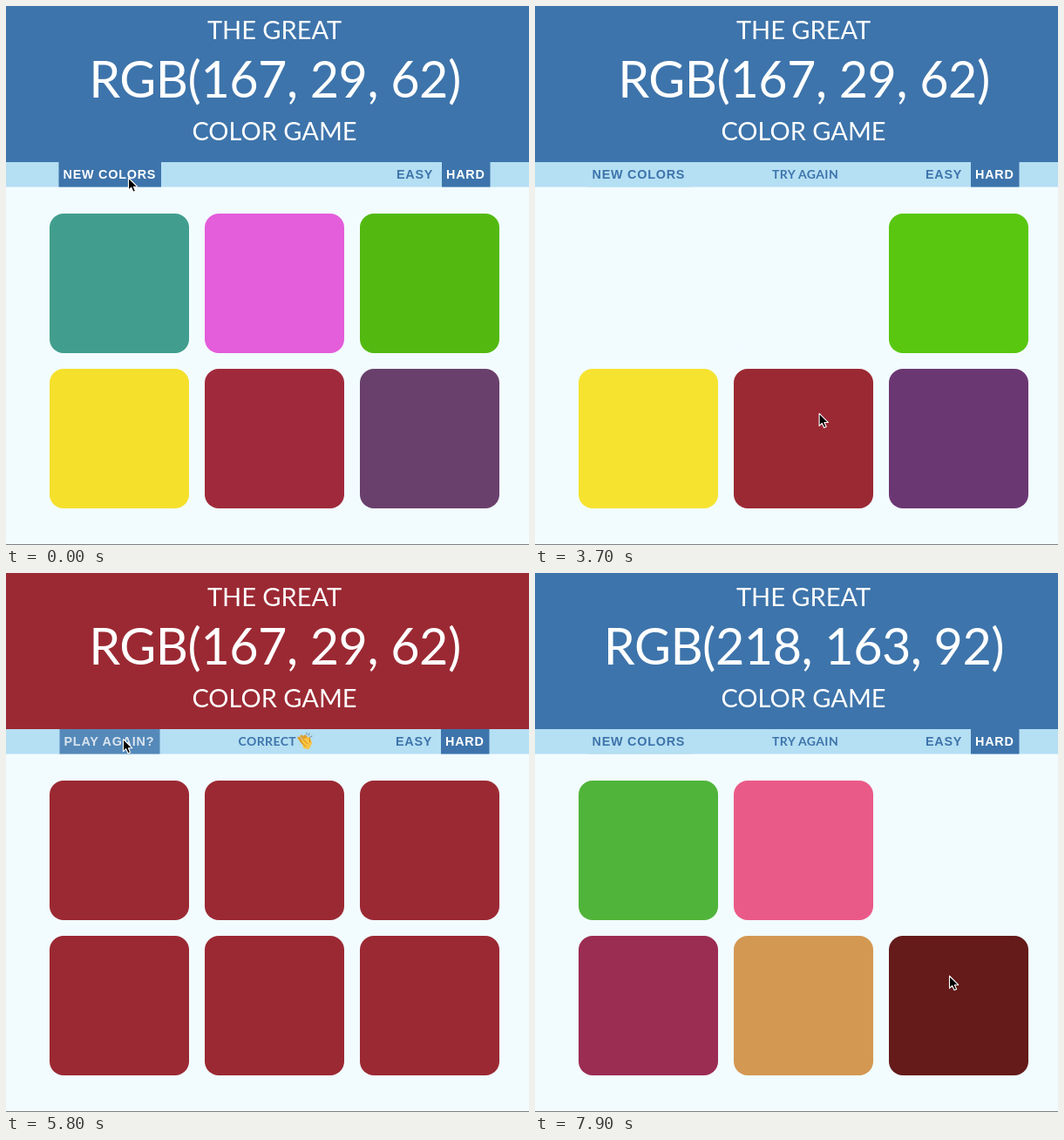
These frames come from a looping animation (600 px wide and 618 px high, 8000 ms). An HTML page:

```html
<!DOCTYPE html>
<html lang="en">
<head>
<meta charset="utf-8">
<title>Color game</title>
<style>
  html, body { margin: 0; width: 100%; height: 100%; overflow: hidden; background: #f2fcff; }
  svg { display: block; width: 100%; height: 100%; }
  .title { font-family: Lato, "Open Sans", sans-serif; font-size: 29px; fill: #fff; text-anchor: middle; }
  .big { font-size: 57.5px; letter-spacing: -.5px; }
  .nav { font: bold 14.4px "Liberation Sans", Arial, sans-serif; letter-spacing: .75px; fill: #3d74ab; }
  .note { font: bold 14px Lato, "Open Sans", sans-serif; letter-spacing: .4px; fill: #3d74ab; }
</style>
</head>
<body>
<svg viewBox="0 0 600 618">
  <rect width="600" height="618" fill="#f2fcff"/>
  <rect id="header" width="600" height="179"/>
  <text class="title" x="308" y="38">THE GREAT</text>
  <text class="title big" id="goal" x="308.5" y="105"></text>
  <text class="title" x="308" y="154">COLOR GAME</text>

  <rect y="179" width="600" height="28.5" fill="#b5dff3"/>
  <rect id="resetBox" y="179" height="28.5"/>
  <text class="nav" id="reset" y="197.5"></text>
  <text class="note" id="note" y="197.5"></text>
  <g id="modes">
    <text class="nav" x="448" y="197.5">EASY</text>
    <rect x="500" y="179" width="55.5" height="28.5" fill="#3d74ab"/>
    <text class="nav" x="505" y="197.5" style="fill:#fff">HARD</text>
  </g>
  <g id="clap" transform="translate(334 183)" stroke-linecap="round" stroke-linejoin="round" fill="none">
    <path d="M2 6 8 14M5 4 11 11M9 4 13 9" stroke="#e0a02a" stroke-width="3"/>
    <path d="M6 9 14 6 16 12 13 18 8 17Z" fill="#f7c544" stroke="#f7c544" stroke-width="2"/>
    <path d="M4 10 10 16M7 8 12 13M14 6 15 11" stroke="#d08a20" stroke-width="1"/>
    <path d="M11 0V2M14 1 13 3M17 4 15 5" stroke="#7c98ad" stroke-width="1.2"/>
  </g>

  <g id="board"></g>
  <rect y="617" width="600" height="1" fill="#7d8183"/>
  <path id="cursor" d="M0 0V14.2L3.2 11.2 5.5 16.3 8.1 15.2 5.9 10.2H10.2Z"
        fill="#000" stroke="#fff" stroke-width="1.1" stroke-linejoin="round"/>
</svg>

<script>
const LOOP = 8000, FADE = 600;
const WIN = 4120, RESET = 6095, MISS = 7150;
const BLUE = '#3d74ab', NAV = '#b5dff3', BG = '#f2fcff', RED = '#9b2933';

// Each square: starting colour, then [time, new colour] steps.
const squares = [
  ['#419e8e', [0, '#43a293'], [1900, BG], [WIN, RED], [RESET, '#51b43a']],
  ['#e45dda', [0, '#e762e1'], [2950, BG], [WIN, RED], [RESET, '#ea5a88']],
  ['#53b910', [0, '#59c710'], [WIN, RED], [RESET, '#5aa726'], [MISS, BG]],
  ['#f5e02b', [0, '#f6e330'], [WIN, RED], [RESET, '#9b2c52']],
  ['#a02a3b', [0, RED], [RESET, '#d39852']],
  ['#69406c', [0, '#6b3772'], [WIN, RED], [RESET, '#641b1a']]
];
const hoverBox = [BLUE, [520, NAV], [5500, BLUE], [6620, NAV]];
const hoverText = ['#ffffff', [520, BLUE], [5500, '#ffffff'], [6620, BLUE]];

// [time, x, y] of the pointer tip
const path = [
  [0, 140.5, 197], [300, 141, 198], [1300, 221.5, 385], [1750, 165, 345], [2050, 165, 340],
  [2700, 338, 320], [3050, 338, 322], [3800, 325.5, 474.5], [4950, 325.5, 474.5],
  [5750, 134.5, 190.5], [6350, 134.5, 190.5], [7000, 470, 325], [7300, 472, 330], [7900, 475.5, 462]
];

const $ = id => document.getElementById(id);
const set = (el, attrs) => { for (const k in attrs) el.setAttribute(k, attrs[k]); };
const clamp = v => Math.min(1, Math.max(0, v));
const rgb = hex => [1, 3, 5].map(i => parseInt(hex.slice(i, i + 2), 16));
const bezier = (s, a, b) => 3 * s * (1 - s) ** 2 * a + 3 * s * s * (1 - s) * b + s ** 3;

// CSS "ease" curve
function ease(x) {
  if (x <= 0 || x >= 1) return clamp(x);
  let lo = 0, hi = 1;
  for (let i = 0; i < 20; i++) {
    const mid = (lo + hi) / 2;
    if (bezier(mid, .25, .25) < x) lo = mid; else hi = mid;
  }
  return bezier(lo, .1, 1);
}

function colourAt([start, ...steps], t) {
  const mixed = steps.reduce((from, [at, hex]) => {
    const k = ease((t - at) / FADE), to = rgb(hex);
    return from.map((v, i) => v + (to[i] - v) * k);
  }, rgb(start));
  return `rgb(${mixed.map(Math.round)})`;
}

function pointerAt(t) {
  const i = path.findIndex(p => p[0] > t);
  if (i < 0) return path[path.length - 1].slice(1);
  const [t0, x0, y0] = path[i - 1], [t1, x1, y1] = path[i];
  const u = (t - t0) / (t1 - t0), k = u * u * (3 - 2 * u);
  return [x0 + (x1 - x0) * k, y0 + (y1 - y0) * k];
}

const tiles = squares.map((_, i) => {
  const el = document.createElementNS('http://www.w3.org/2000/svg', 'rect');
  set(el, { x: 50 + i % 3 * 178, y: i < 3 ? 238 : 416, width: 160, height: 160, rx: 16 });
  return $('board').appendChild(el);
});

function render(t) {
  const won = t >= WIN && t < RESET;
  const missed = (t >= 1900 && t < WIN) || t >= MISS;
  set($('header'), { fill: won ? RED : BLUE });
  $('goal').textContent = t < RESET ? 'RGB(167, 29, 62)' : 'RGB(218, 163, 92)';
  $('reset').textContent = won ? 'PLAY AGAIN?' : 'NEW COLORS';
  $('reset').style.fill = colourAt(hoverText, t);
  set($('reset'), { x: won ? 66.5 : 65.5 });
  set($('resetBox'), { x: won ? 61.5 : 60.5, width: won ? 115 : 117.5, fill: colourAt(hoverBox, t) });
  $('note').textContent = won ? 'CORRECT' : missed ? 'TRY AGAIN' : '';
  set($('note'), { x: won ? 266.5 : 272 });
  set($('clap'), { visibility: won ? 'visible' : 'hidden' });
  set($('modes'), { transform: `translate(${won ? -1 : 0} 0)` });
  tiles.forEach((el, i) => set(el, { fill: colourAt(squares[i], t) }));
  set($('cursor'), { transform: `translate(${pointerAt(t)})` });
}

const begin = performance.now();
function tick() {
  render((performance.now() - begin) % LOOP);
  requestAnimationFrame(tick);
}
tick();
</script>
</body>
</html>
```
